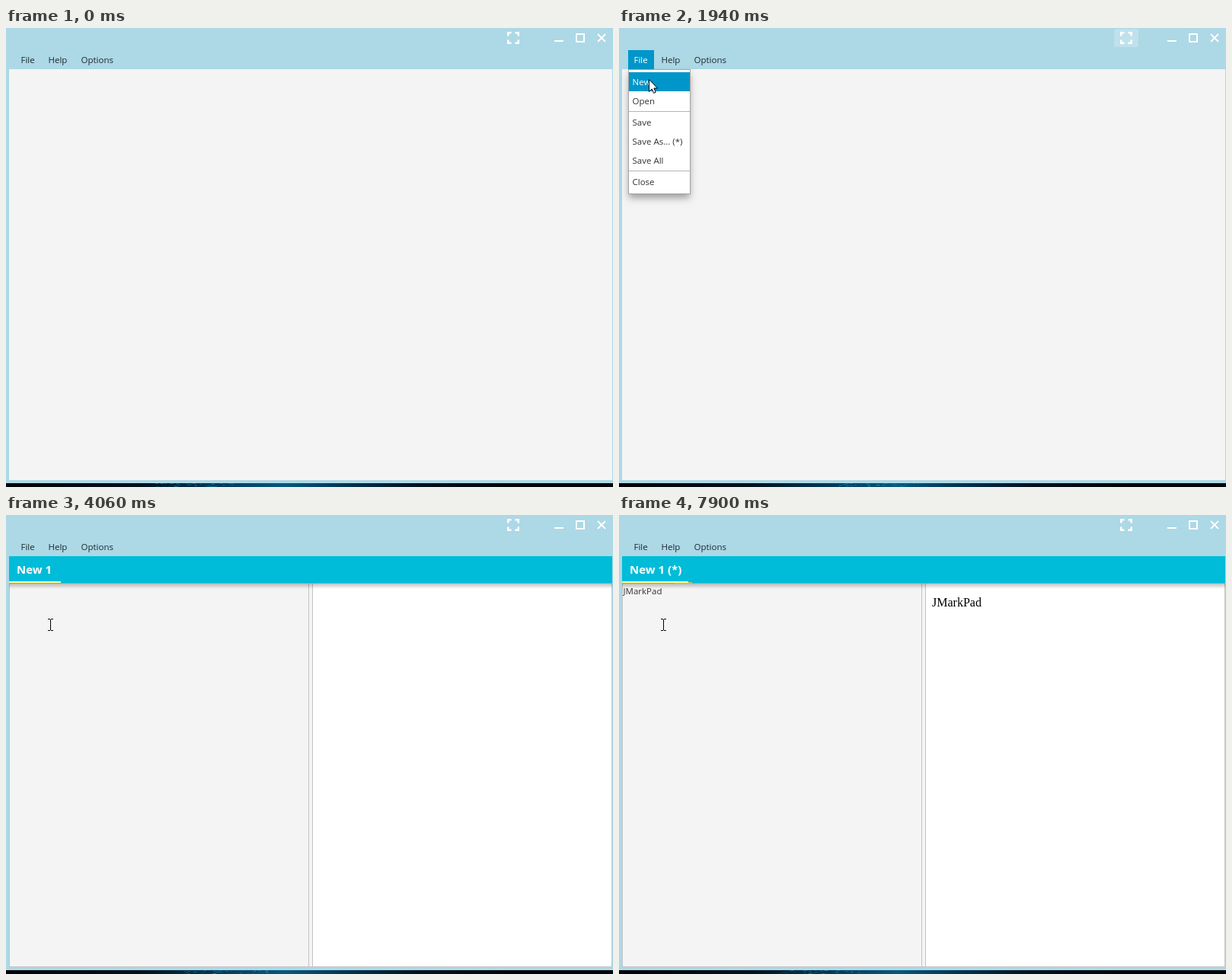
Write an HTML page with a canvas that moves like this. It is 797 by 602 pixels and loops after 8 s.

```html
<!DOCTYPE html>
<html lang="en">
<head>
<meta charset="utf-8">
<title>Text editor</title>
<style>
  html, body { margin: 0; width: 100%; height: 100%; overflow: hidden; }
  canvas { display: block; }
</style>
</head>
<body>
<canvas id="stage" width="797" height="602"></canvas>
<script>
const ctx = document.getElementById('stage').getContext('2d');
const LOOP = 8000;
const FRAME = 82;

const SKY = '#add8e6', PANE = '#f4f4f4', ACCENT = '#0096c9', TAB = '#00bcd8';
const UI = '11.5px "Open Sans", "Noto Sans", sans-serif';
const TITLE = 'bold 15px "Open Sans", "Noto Sans", sans-serif';
const SERIF = '16px "Liberation Serif", serif';

// Moments of the story, in ms
const HELP_ON = 740, FILE_ON = 1130, MENU_OPEN = 1550, TAB_OPEN = 2200;
const FOCUS = 2450, HOME_KEY = 7200;
const WORD = 'JMarkPad';
const KEYS = [4180, 4400, 4650, 4900, 5250, 5700, 6050, 6300];

// Pointer path: [time, x, y]
const PATH = [
  [240, 250, 602], [420, 150, 300], [560, 95, 110], [690, 81, 62],
  [720, 81, 62], [780, 72, 45], [1000, 70, 42], [1150, 34, 42],
  [1580, 32, 44], [1800, 39, 67], [3450, 39, 67], [3850, 58, 144]
];

const clamp = (v, lo = 0, hi = 1) => Math.min(hi, Math.max(lo, v));
const between = (t, a, b) => t >= a && t < b;

function rect(x, y, w, h, color) {
  ctx.fillStyle = color;
  ctx.fillRect(x, y, w, h);
}

function text(string, x, y, font, color) {
  ctx.font = font;
  ctx.fillStyle = color;
  ctx.fillText(string, x, y);
}

function strokePath(d, width, color) {
  ctx.lineWidth = width;
  ctx.strokeStyle = color;
  ctx.stroke(new Path2D(d));
}

function random(seed) {
  const v = Math.sin(seed * 127.1 + 11.7) * 43758.5453;
  return v - Math.floor(v);
}

function pointerAt(t) {
  const next = PATH.findIndex(p => p[0] > t);
  if (next < 0) return PATH[PATH.length - 1].slice(1);
  if (next === 0) return null;
  const [t0, x0, y0] = PATH[next - 1], [t1, x1, y1] = PATH[next];
  const k = (t - t0) / (t1 - t0);
  return [x0 + (x1 - x0) * k, y0 + (y1 - y0) * k];
}

// Strip of dark blue desktop below the window
function drawDesktop(t) {
  const glow = ctx.createLinearGradient(0, 0, 797, 0);
  [[0, '#000206'], [.22, '#00101c'], [.33, '#013350'], [.46, '#06587f'],
   [.56, '#013350'], [.68, '#00101f'], [.84, '#000306'], [1, '#000206']]
    .forEach(stop => glow.addColorStop(...stop));
  rect(0, 597, 797, 5, glow);
  const step = Math.floor(t / FRAME);
  const center = 230 + 150 * random(step + 3);
  for (let i = 0; i < 40; i++) {
    const seed = step * 61 + i;
    const x = center + (random(seed) - .5) * 110;
    const alpha = .1 + .4 * random(seed + .3);
    rect(x, 597 + Math.floor(random(seed + .6) * 5), 1 + 4 * random(seed + .8), 1,
         `rgba(40,160,205,${alpha})`);
  }
}

function drawTitleBar(t) {
  rect(0, 0, 797, 597, SKY);
  if (between(t, MENU_OPEN, FOCUS)) {
    // Ripple that fills the focused button
    ctx.save();
    ctx.beginPath();
    ctx.roundRect(650, 1, 32, 24, 2);
    ctx.clip();
    ctx.beginPath();
    ctx.arc(666, 13, 21 * clamp((t - MENU_OPEN) / 300), 0, Math.PI * 2);
    ctx.fillStyle = 'rgba(255,255,255,.22)';
    ctx.fill();
    ctx.restore();
  }
  strokePath('M659.25 10.5V6.25H663.5M668.5 6.25H672.75V10.5M672.75 15.5V19.75H668.5M663.5 19.75H659.25V15.5', 2.5, '#fff');
  rect(720, 16, 12, 2, '#fff');
  strokePath('M749 8H759V18H749Z', 2, '#fff');
  strokePath('M777 8L787 18M787 8L777 18', 1.8, '#fff');
}

function drawMenuBar(t) {
  const helpOn = between(t, HELP_ON, FILE_ON - 40);
  const fileOn = between(t, FILE_ON, TAB_OPEN);
  if (helpOn) rect(48, 29, 41, 25, ACCENT);
  if (fileOn) rect(12, 29, 34, 25, ACCENT);
  text('File', 19.5, 46, UI, fileOn ? '#fff' : '#1c2a30');
  text('Help', 55.5, 46, UI, helpOn ? '#fff' : '#1c2a30');
  text('Options', 98.5, 46, UI, '#1c2a30');
}

function drawDropdown(t) {
  ctx.save();
  ctx.shadowColor = 'rgba(0,0,0,.35)';
  ctx.shadowBlur = 9;
  ctx.shadowOffsetY = 5;
  rect(13, 56, 80, 162, '#fff');
  ctx.restore();
  rect(12, 54, 82, 164, '#a5a5a5');
  rect(13, 55, 80, 162, '#fff');
  const newOn = t > 1720;
  if (newOn) rect(13, 58, 80, 25, ACCENT);
  rect(13, 109, 80, 1, '#b4b4b4');
  rect(13, 187, 80, 1, '#b4b4b4');
  [['New', 75], ['Open', 100], ['Save', 128], ['Save As... (*)', 153],
   ['Save All', 178], ['Close', 206]].forEach(([label, y], i) =>
    text(label, 17.5, y, UI, newOn && i === 0 ? '#fff' : '#333'));
}

function drawEditor(t) {
  const typed = WORD.slice(0, KEYS.filter(k => t >= k).length);

  rect(4, 90, 792, 503, '#c4c4c4');
  rect(5, 90, 392, 502, PANE);
  rect(398, 90, 4, 502, PANE);
  rect(403, 90, 392, 502, '#fff');

  // Tab header with its shadow
  const shade = ctx.createLinearGradient(0, 89, 0, 97);
  shade.addColorStop(0, 'rgba(0,0,0,.27)');
  shade.addColorStop(1, 'rgba(0,0,0,0)');
  rect(4, 89, 792, 8, shade);
  rect(4, 54, 792, 35.5, TAB);
  text(typed ? 'New 1 (*)' : 'New 1', 14, 77, TITLE, '#fff');
  const grow = clamp((t - KEYS[0]) / 250);
  if (grow > 0) rect(72, 88, 24 * grow, 2, '#c9b565');
  rect(4, 87, 68 + 19 * grow, 2, '#ffff8d');

  text(typed, 5.5, 104, UI, '#333');
  text(typed, 411, 120, SERIF, '#000');

  const lastKey = [FOCUS, ...KEYS, HOME_KEY].filter(k => t >= k).pop();
  if (lastKey !== undefined && Math.floor((t - lastKey) / 500) % 2 === 0) {
    ctx.font = UI;
    const offset = t >= HOME_KEY ? 0 : Math.round(ctx.measureText(typed).width);
    rect(6 + offset, 91, 1, 17, '#111');
  }
}

function drawPointer(t) {
  const at = pointerAt(t);
  if (!at) return;
  ctx.save();
  ctx.translate(Math.round(at[0]), Math.round(at[1]));
  if (t > TAB_OPEN && at[1] > 90) {
    strokePath('M-3 -7.5H0M1 -7.5H4M.5 -7V7M-3 7.5H0M1 7.5H4', 1, '#000');
  } else {
    const arrow = 'M.5 .5V16.5L4.2 13L6.6 18.4L9.2 17.3L6.9 12H11.6Z';
    ctx.fillStyle = '#fff';
    ctx.fill(new Path2D(arrow));
    strokePath(arrow, 1, '#000');
  }
  ctx.restore();
}

function draw(t) {
  drawTitleBar(t);
  drawDesktop(t);
  rect(4, 54, 792, 539, PANE);
  if (t >= TAB_OPEN) drawEditor(t);
  drawMenuBar(t);
  if (between(t, MENU_OPEN, TAB_OPEN)) drawDropdown(t);
  drawPointer(t);
}

const start = performance.now();
function tick() {
  draw((performance.now() - start) % LOOP);
  requestAnimationFrame(tick);
}
tick();
</script>
</body>
</html>
```
